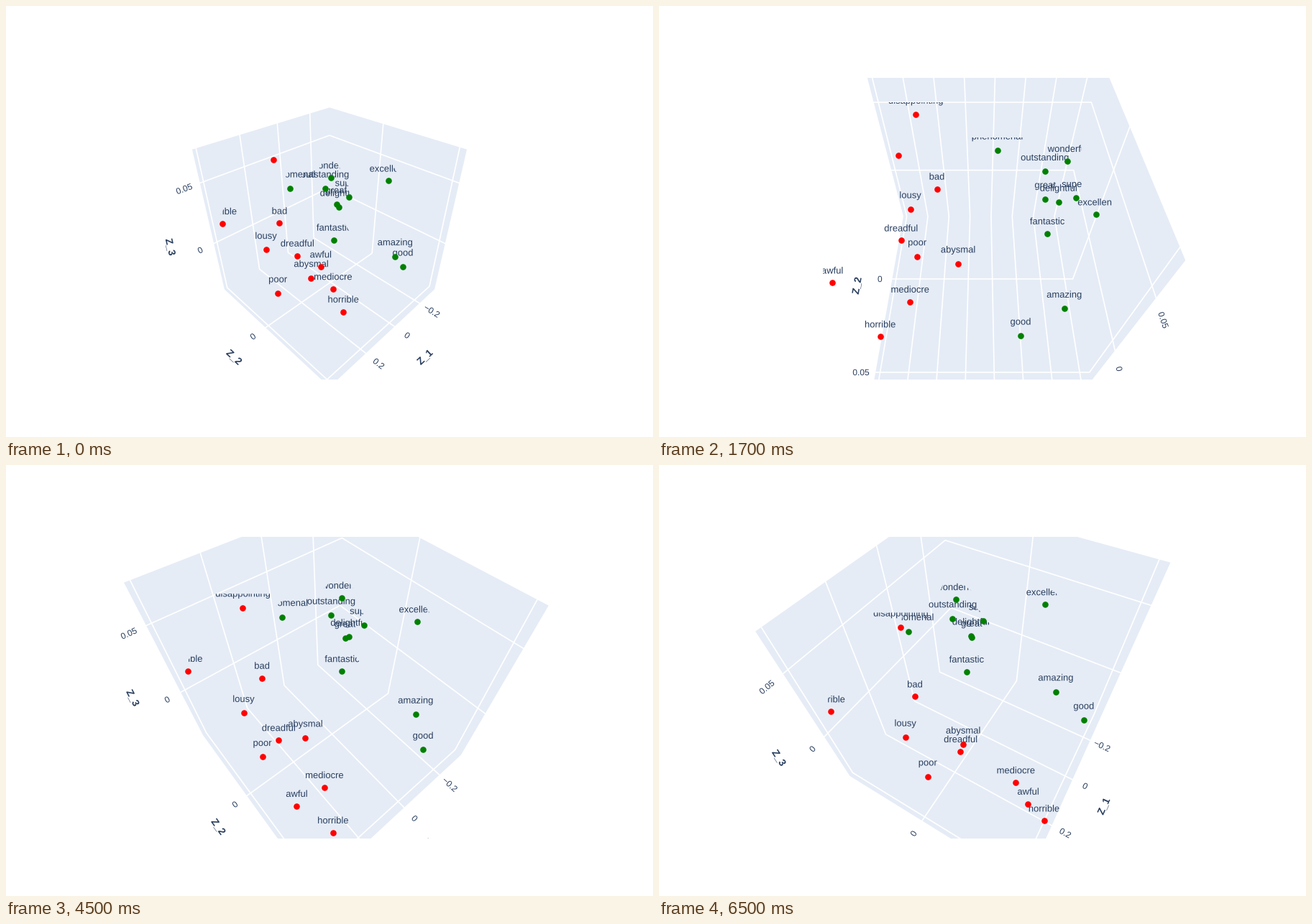
A matplotlib script for the animation above (8000 ms loop, 900 px wide and 600 px high).

```python
import math
from itertools import combinations, product

import matplotlib.pyplot as plt
import numpy as np
from matplotlib.animation import FuncAnimation
from matplotlib.patches import PathPatch
from matplotlib.path import Path
from matplotlib.textpath import TextPath
from matplotlib.transforms import Affine2D

W, H, DPI = 900, 600, 100
TOP, BOTTOM = 100, 520
CX, CY = W / 2, (TOP + BOTTOM) / 2
FOCAL = (BOTTOM - TOP) / 2 / math.tan(math.radians(22.5))
PX = 72 / DPI  # points per pixel
E = 0.5        # half the cube's side
INK, WALL = "#2a3f5f", "#e5ecf6"

# Word positions inside the unit cube.
NEGATIVE = {
    "disappointing": (.244, -.157, .471), "terrible": (.434, -.470, .019),
    "bad": (.212, -.202, .044), "lousy": (.346, -.169, -.061),
    "dreadful": (.336, .100, .047), "poor": (.347, -.098, -.360),
    "awful": (.471, .419, .252), "abysmal": (.127, -.038, -.338),
    "mediocre": (.290, .316, -.074), "horrible": (.378, .470, -.052)}
POSITIVE = {
    "phenomenal": (-.074, -.450, .067), "wonderful": (-.428, -.410, .032),
    "outstanding": (-.310, -.356, .011), "superb": (-.471, -.269, -.089),
    "great": (-.312, -.245, -.071), "delightful": (-.399, -.306, -.159),
    "fantastic": (-.387, -.339, -.470), "excellent": (-.440, .076, .183),
    "amazing": (-.377, .237, -.295), "good": (-.148, .439, -.119)}

# Cube coordinate of each axis = zero + scale * value.
ZERO = (-.0545, -.0432, -.111)
SCALE = (1.333, 10.07, 8.33)

OUTLINE = [(E, -E, E), (-E, -E, E), (-E, E, E), (-E, E, -E), (E, E, -E), (E, -E, -E)]
EDGES = [(np.array(a), np.array(b)) for a, b in combinations(product((-E, E), repeat=3), 2)
         if sum(i != j for i, j in zip(a, b)) == 1]

plt.rcParams["font.family"] = "Liberation Sans"
fig = plt.figure(figsize=(W / DPI, H / DPI), dpi=DPI, facecolor="white")
ax = fig.add_axes([0, 1 - BOTTOM / H, 1, (BOTTOM - TOP) / H])


class Camera:
    """Perspective camera looking at the cube's centre, z up."""

    def __init__(self, eye):
        self.distance = np.linalg.norm(eye)
        self.toward = np.array(eye) / self.distance
        right = np.cross((0, 0, 1), self.toward)
        self.right = right / np.linalg.norm(right)
        self.up = np.cross(self.toward, self.right)
        self.square_on = abs(eye[0]) < 0.01

    def project(self, points):
        points = np.asarray(points, float)
        zoom = FOCAL / (self.distance - points @ self.toward)
        return np.stack([CX + zoom * (points @ self.right),
                         CY - zoom * (points @ self.up)], axis=-1)

    def slice(self, point):
        """Outline, on screen, of the cube cut at the point's depth."""
        cuts = []
        for a, b in EDGES:
            da, db = (a - point) @ self.toward, (b - point) @ self.toward
            if da * db < 0:
                cuts.append(a + (b - a) * da / (da - db))
        outline = self.project(cuts)
        dx, dy = (outline - outline.mean(axis=0)).T
        return Path(outline[np.argsort(np.arctan2(dy, dx))])


def draw_text(text, x, y, size, angle=0, anchor="center", weight="normal"):
    """Text placed by the centre or the bottom of its ink; angle is clockwise."""
    with plt.rc_context({"font.weight": weight}):
        glyphs = TextPath((0, 0), text, size=size)
    ink = glyphs.get_extents()
    base = ink.y0 if anchor == "bottom" else (ink.y0 + ink.y1) / 2
    place = (Affine2D().translate(-(ink.x0 + ink.x1) / 2, -base).scale(1, -1)
             .rotate_deg(angle).translate(x, y))
    return ax.add_patch(PathPatch(place.transform_path(glyphs), fc=INK, lw=0, zorder=2))


def upright_angle(start, end):
    dx, dy = end - start
    return (math.degrees(math.atan2(dy, dx)) + 90) % 180 - 90


def tick_values(axis, step):
    low, high = ((side - ZERO[axis]) / SCALE[axis] for side in (-E, E))
    return [k * step for k in range(math.ceil(low / step), math.floor(high / step) + 1)]


def grid_line(axis, t):
    """A tick's line, bent over the two walls it crosses."""
    return ([(t, -E, E), (t, -E, -E), (t, E, -E)],
            [(-E, t, E), (-E, t, -E), (E, t, -E)],
            [(E, -E, t), (-E, -E, t), (-E, E, t)])[axis]


def draw_axis(camera, axis, step):
    if axis == 2 and camera.square_on:
        edge, out = (-E, E, 0), 1
    else:
        edge, out = ((0, E, -E), (E, 0, -E), (E, -E, 0))[axis], (1, 0, 0)[axis]
    along, outward = np.eye(3)[axis], np.eye(3)[out] * camera.distance

    for value in tick_values(axis, step):
        t = ZERO[axis] + SCALE[axis] * value
        ax.plot(*camera.project(grid_line(axis, t)).T, color="white", lw=1.7 * PX, zorder=1)
        tick = edge + t * along
        start, end = camera.project([tick, tick + 0.0425 * outward])
        draw_text(f"{value:g}".replace("-", "−"), *end, 12, upright_angle(start, end))

    middle = edge + 0.1153 * outward
    angle = upright_angle(*camera.project([edge - 0.1 * along, edge + 0.1 * along]))
    draw_text(f"Z_{axis + 1}", *camera.project(middle), 14, angle, weight="bold")


def draw_words(camera, words, color):
    dots = camera.project(list(words.values()))
    ax.scatter(*dots.T, s=(8.6 * PX) ** 2, color=color, lw=0, zorder=3)
    for (word, point), (x, y) in zip(words.items(), dots):
        # Labels face the camera; whatever sticks out of the cube is cut off.
        label = draw_text(word, x, y - 12.7, 13, anchor="bottom")
        label.set_clip_path(camera.slice(np.array(point)), ax.transData)


def eye_at(frame):
    """A diagonal view for one step, then 20 degree jumps every four steps."""
    if frame == 0:
        return 1.25, 1.25, 1.25
    turn = math.radians(90 - 20 * ((frame - 1) // 4))
    return math.cos(turn), math.sin(turn), 1.25


def update(frame):
    ax.clear()
    ax.set_xlim(0, W)
    ax.set_ylim(BOTTOM, TOP)
    ax.axis("off")
    camera = Camera(eye_at(frame))
    ax.fill(*camera.project(OUTLINE).T, color=WALL, lw=0, zorder=0)
    for axis, step in enumerate((0.1 if camera.square_on else 0.2, 0.05, 0.05)):
        draw_axis(camera, axis, step)
    draw_words(camera, NEGATIVE, "red")
    draw_words(camera, POSITIVE, "green")
    return []


animation = FuncAnimation(fig, update, frames=16, interval=500, repeat=True,
                          repeat_delay=0, blit=False)
plt.show()
```
